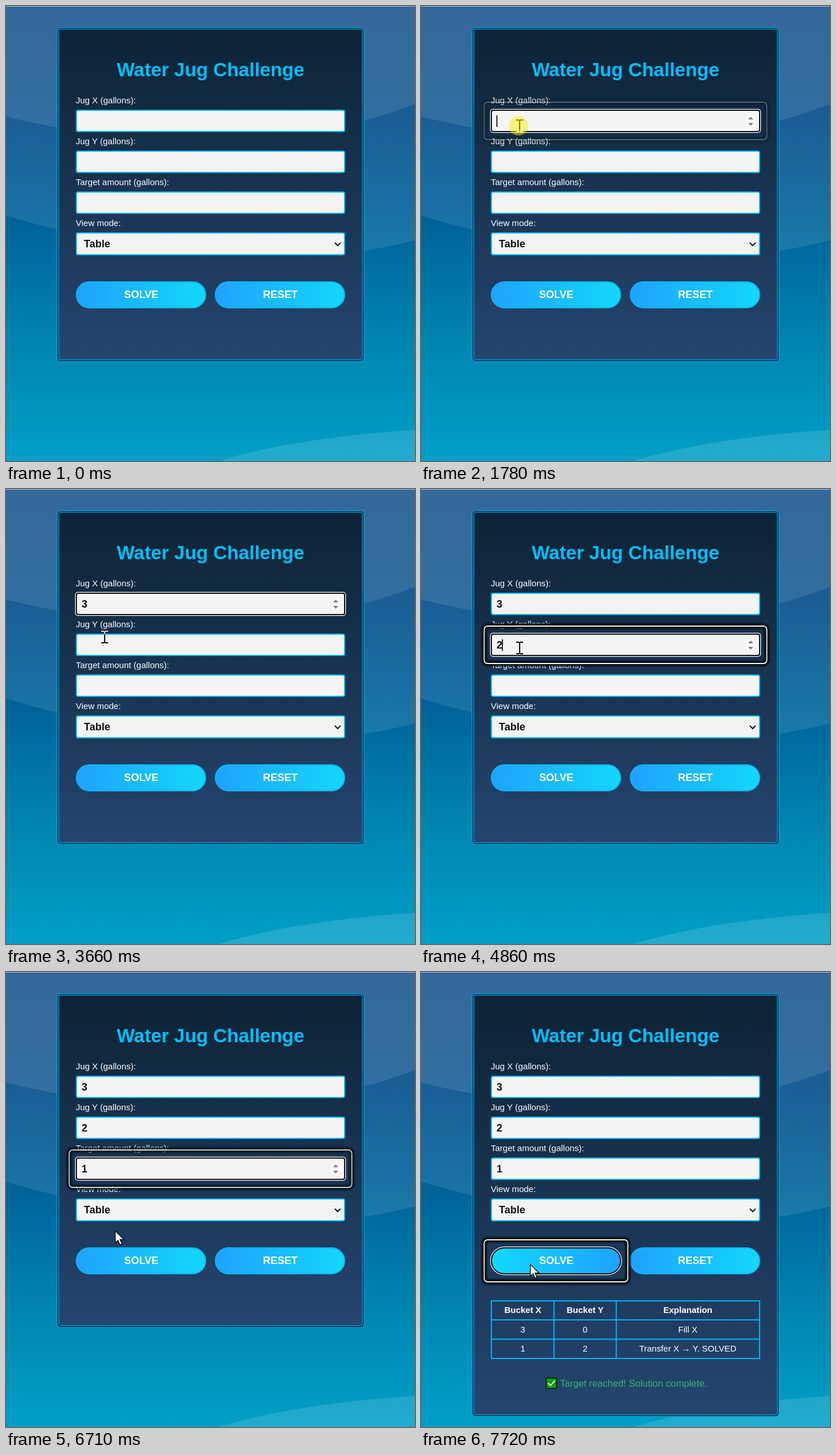
Recreate the animation shown at these times as an HTML page. Size 709 by 790 pixels, loop 8 s.

```html
<!DOCTYPE html>
<html lang="en">
<head>
<meta charset="utf-8">
<title>Water Jug Challenge</title>
<style>
  html, body { margin: 0; width: 100%; height: 100%; overflow: hidden; background: #009fc6; }
  svg { display: block; width: 709px; height: 790px; font-family: "Liberation Sans", Arial, sans-serif; }
  .label { font-size: 15px; fill: #fff; }
  .value { font-size: 18px; font-weight: bold; fill: #111; }
  .button { font-size: 18px; font-weight: bold; fill: #fff; }
  .mid { text-anchor: middle; }
  .bold { font-weight: bold; }
  .field { fill: #f4f4f4; stroke: #00b7f4; stroke-width: 2; }
  .line { fill: none; stroke: #00b7f4; stroke-width: 2; }
</style>
</head>
<body>
<svg id="stage" viewBox="0 0 709 790">
  <defs>
    <linearGradient id="sea" x2="0" y2="1">
      <stop offset="0" stop-color="#044381"/>
      <stop offset=".25" stop-color="#004c8a"/>
      <stop offset=".47" stop-color="#006299"/>
      <stop offset=".76" stop-color="#0087b2"/>
      <stop offset="1" stop-color="#009fc6"/>
    </linearGradient>
    <linearGradient id="night" x2="0" y2="1">
      <stop offset="0" stop-color="#0d2335"/>
      <stop offset="1" stop-color="#25456f"/>
    </linearGradient>
    <linearGradient id="right"><stop stop-color="#1fa2ff"/><stop offset="1" stop-color="#12d8fa"/></linearGradient>
    <linearGradient id="left"><stop stop-color="#12d8fa"/><stop offset="1" stop-color="#1fa2ff"/></linearGradient>
    <filter id="soft" x="-10%" y="-30%" width="120%" height="160%"><feGaussianBlur stdDeviation="1.6"/></filter>
  </defs>

  <rect width="709" height="790" fill="url(#sea)"/>
  <g fill="#fff" fill-opacity=".1">
    <path d="M0 0H709V170Q665 187 621 199C480 240 250 243 88 211Q44 203 0 192Z"/>
    <path d="M0 0H709V407Q665 418 621 425C460 453 260 437 88 388Q44 377 0 364Z"/>
    <path d="M368 790C460 762 580 744 709 736V790Z" fill-opacity=".13"/>
  </g>
  <rect width="709" height="1" fill="#b4c6d6"/>

  <g stroke="#00a8ea" stroke-width="1.3">
    <rect id="outer" x="88.6" y="37.6" width="532" rx="6" fill="#0d2335"/>
    <rect id="inner" x="91.5" y="40.4" width="526.2" rx="3.5" fill="url(#night)"/>
  </g>
  <text class="mid bold" x="354.5" y="122" font-size="33" fill="#00bfff">Water Jug Challenge</text>

  <g id="form"></g>

  <g id="result">
    <path class="line" d="M121 571H588M122 604H587M122 637.5H587M121 671H588M122 571V671M230.5 571V671M338.5 571V671M587 571V671"/>
    <g id="cells" class="label mid"></g>
    <rect x="217" y="705" width="18" height="18" fill="#149a18" stroke="#061a06" stroke-width="1.5"/>
    <path d="M220.5 714L224.5 718L232 709.5" fill="none" stroke="#fff" stroke-width="1.8"/>
    <text x="241" y="720" font-size="16.5" fill="#2fb870">Target reached! Solution complete.</text>
  </g>

  <g id="outline" fill="none">
    <rect id="outlineWhite" stroke="#fff" stroke-width="1.5"/>
    <rect id="outlineBlack" stroke="#0c0c0c" stroke-width="2"/>
  </g>
  <rect id="caret" width="1.7" height="20" fill="#000"/>
  <g id="ring" fill="none">
    <rect id="ringShade" stroke="#060a10" stroke-width="9" filter="url(#soft)"/>
    <rect id="ringLine" stroke="#fdf8ec" stroke-width="1.8"/>
  </g>

  <path id="beam" d="M-6 -11H-1L0 -10L1 -11H6V-9H1V9H6V11H1L0 10L-1 11H-6V9H-1V-9H-6Z" fill="#fff" style="mix-blend-mode:difference"/>
  <path id="arrow" d="M.5 .5V21L5.2 16.8L8.6 24.5L12 23L8.7 15.5H15.3Z" fill="#fff" stroke="#000" stroke-width="1.2"/>
  <circle id="press" r="16.7" fill="#fff000" fill-opacity=".5"/>
</svg>

<script>
const LOOP = 8000, ROW = 71, TOP = 180;
const $ = id => document.getElementById(id);
const set = (id, attrs) => { for (const k in attrs) $(id).setAttribute(k, attrs[k]); };
const show = (id, on) => set(id, { visibility: on ? 'visible' : 'hidden' });
const clamp = v => Math.min(1, Math.max(0, v));

// Static form parts
const labels = ['Jug X (gallons):', 'Jug Y (gallons):', 'Target amount (gallons):', 'View mode:'];
let form = labels.map((label, i) => {
  const y = TOP + ROW * i;
  const box = `<text class="label" x="121" y="${y - 11}">${label}</text>
    <rect class="field" x="122" y="${y + 1}" width="465" height="${i < 3 ? 37 : 38}" rx="3"/>`;
  if (i === 3) return box + `<text class="value" x="135" y="${y + 26}">Table</text>
    <path d="M570 ${y + 18}l5 5l5 -5" fill="none" stroke="#111" stroke-width="2"/>`;
  return box + `<text class="value" id="value${i}" x="131" y="${y + 26}"></text>
    <g id="spin${i}"><rect x="564" y="${y + 10}" width="15" height="20" fill="#fbfbfb"/>
    <path d="M567 ${y + 17}l4.5 -5l4.5 5zM567 ${y + 23}l4.5 5l4.5 -5z" fill="#808080"/></g>`;
}).join('');
form += [['SOLVE', 121], ['RESET', 362]].map(([name, x]) =>
  `<rect id="${name}" x="${x + 1}" y="479" width="224" height="45" rx="22.5" fill="url(#right)" stroke="#0db4f6" stroke-width="2"/>
   <text class="button mid" x="${x + 113.5}" y="507">${name}</text>`).join('');
$('form').innerHTML = form;

const rows = [['Bucket X', 'Bucket Y', 'Explanation'], ['3', '0', 'Fill X'], ['1', '2', 'Transfer X → Y. SOLVED']];
$('cells').innerHTML = rows.map((row, r) => row.map((cell, c) =>
  `<text class="${r ? '' : 'bold'}" x="${[176.5, 284.5, 462.5][c]}" y="${592 + 33.6 * r}">${cell}</text>`).join('')).join('');

// Timeline
const pointer = [
  [580, 455, 613], [780, 203, 350], [1110, 203, 350], [1260, 171, 208], [3450, 171, 208],
  [3660, 171, 257], [3700, 171, 257], [3820, 171, 264], [3970, 171, 264], [4070, 171, 276],
  [5230, 171, 276], [5480, 168, 338], [6500, 168, 338], [6710, 189, 449], [7100, 189, 507]
];
const typed = [[2860, '3'], [4860, '2'], [6380, '1']];
const presses = [[1780, 1910], [4080, 4310], [5500, 5710], [7500, 7720]];
const carets = [[1780, 2310], [2860, 3390], [4080, 4310], [4860, 5390], [5500, 5840], [6380, 6660], [7190, 7500]];
const HOVER_SOLVE = 6910, SOLVED = 7620;
const during = (spans, t) => spans.some(([a, b]) => t >= a && t < b);

function pointerAt(t) {
  const i = pointer.findIndex(p => p[0] > t);
  if (i < 0) return pointer.at(-1).slice(1);
  if (i === 0) return [-99, -99];
  const [t0, x0, y0] = pointer[i - 1], [t1, x1, y1] = pointer[i];
  const k = (t - t0) / (t1 - t0);
  return [x0 + (x1 - x0) * k, y0 + (y1 - y0) * k];
}

function drawFocus(focus, t) {
  show('outline', focus >= 0);
  show('ring', focus >= 0);
  if (focus < 0) return;
  const button = focus === 3;
  const x = 121, y = button ? 478 : TOP + ROW * focus;
  const w = button ? 226 : 467, h = button ? 47 : 39;
  const frame = (id, grow, rx, growY = grow) =>
    set(id, { x: x - grow, y: y - growY, width: w + 2 * grow, height: h + 2 * growY, rx });
  frame('outlineWhite', .5, button ? 24 : 4);
  frame('outlineBlack', -1, button ? 22.5 : 3);
  frame('ringShade', 11.5, 6, 13);
  frame('ringLine', 11.5, 6, 13);
  const age = t - presses[focus][0];
  set('ring', { opacity: Math.min(clamp((age + 40) / 150), 1 - clamp((age - 1100) / 520)) });
}

function draw(t) {
  const [px, py] = pointerAt(t);
  const focus = presses.filter(p => t >= p[0]).length - 1;
  const solved = t >= SOLVED;

  set('outer', { height: solved ? 734 : 579.5 });
  set('inner', { height: solved ? 728.4 : 573.8 });
  show('result', solved);
  set('SOLVE', { fill: `url(#${t >= HOVER_SOLVE ? 'left' : 'right'})` });

  typed.forEach(([at, digit], i) => {
    const y = TOP + ROW * i;
    $('value' + i).textContent = t >= at ? digit : '';
    show('spin' + i, focus === i || (py > y + 7 && py < y + 39));
  });

  drawFocus(focus, t);
  show('caret', during(carets, t));
  if (focus >= 0 && focus < 3) set('caret', { x: t >= typed[focus][0] ? 140.3 : 130.7, y: TOP + 10 + ROW * focus });

  const overText = py < 361;
  show('beam', overText && py > 0);
  show('arrow', !overText);
  set('beam', { transform: `translate(${px} ${py})` });
  set('arrow', { transform: `translate(${px} ${py})` });
  show('press', during(presses, t));
  set('press', { cx: px - 2, cy: py });
}

const start = performance.now();
function tick() {
  draw((performance.now() - start) % LOOP);
  requestAnimationFrame(tick);
}
tick();
</script>
</body>
</html>
```
